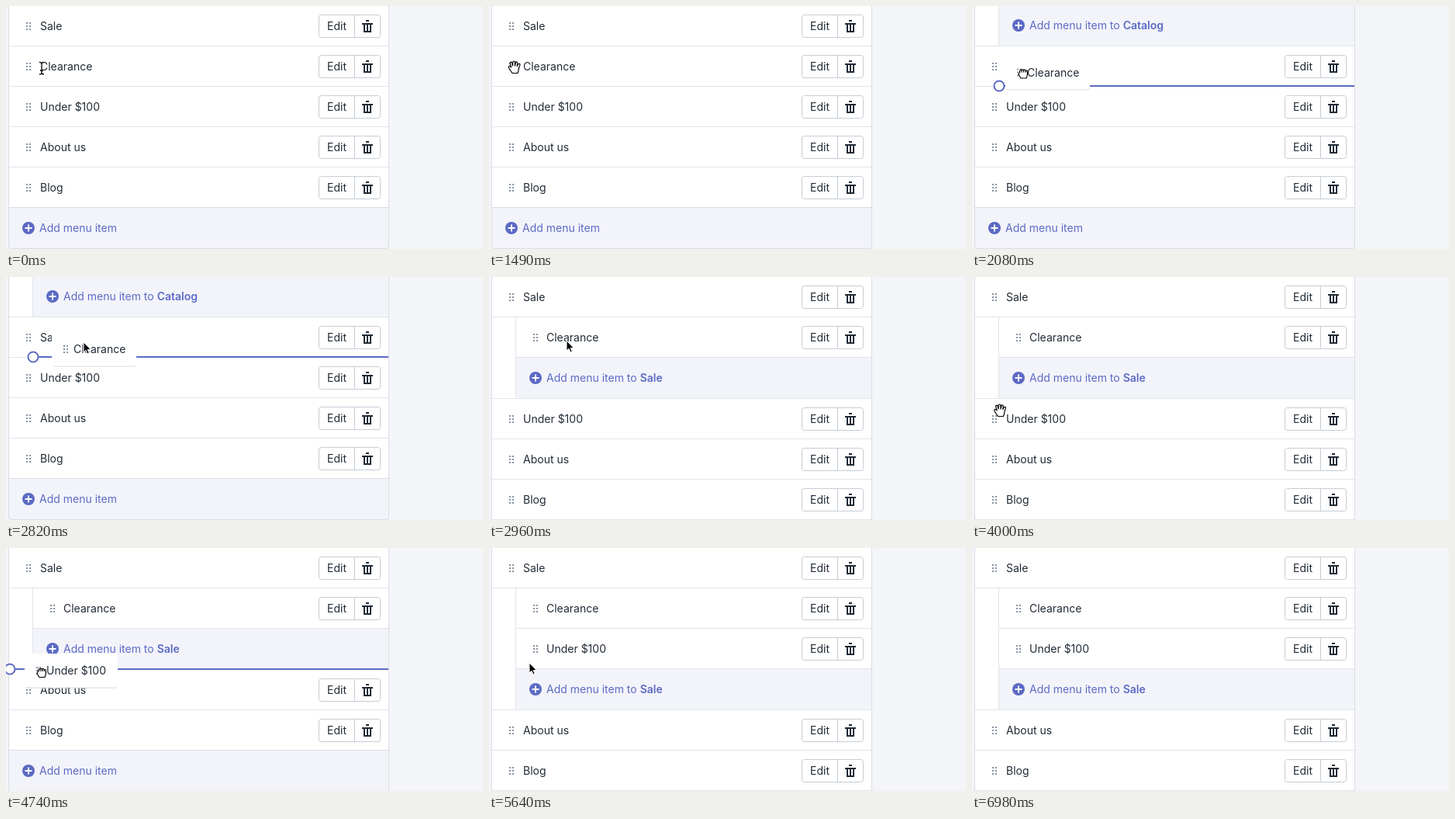
Animation of 615x313 px, one loop 7650 ms. Source, as an HTML page:

```html
<!DOCTYPE html>
<html lang="en">
<head>
<meta charset="utf-8">
<title>Nested menu editor</title>
<style>
html, body { margin: 0; width: 100%; height: 100%; overflow: hidden; background: #f4f5f9; }
svg { display: block; font: 14px Inter, "Open Sans", sans-serif; }
text { fill: #212b36; white-space: pre; }
.strong { font-weight: 600; }
</style>
</head>
<body>
<svg id="stage" width="615" height="313" viewBox="0 0 615 313"></svg>
<script>
const LOOP = 7650, TICK = 148.3;
const INDIGO = '#5c6ac4', TINT = '#f3f4fa', LINE = '#e1e4ea', EDGE = '#d9dde4';
const stage = document.getElementById('stage');

// [first tick, entries]: '>' is a nested item, '+' an add button
const scenes = [
  [0, ['Sale', 'Clearance', 'Under $100', 'About us', 'Blog', '+']],
  [11, ['+Catalog', 'Sale', 'Under $100', 'About us', 'Blog', '+']],
  [20, ['Sale', '>Clearance', '+Sale', 'Under $100', 'About us', 'Blog']],
  [31, ['Sale', '>Clearance', '+Sale', 'About us', 'Blog', '+']],
  [37, ['Sale', '>Clearance', '>Under $100', '+Sale', 'About us', 'Blog']]
];

// [tick, x, y, shape]
const pointer = [
  [0, 46, 80, 'beam'], [2, 36, 80, 'open'], [3, 31, 80, 'open'], [9, 31, 80, 'open'],
  [10, 33, 79, 'open'], [11, 35, 80, 'fist'], [17, 97, 93, 'fist'], [18, 99, 93, 'fist'],
  [19, 100, 84, 'arrow'], [20, 100, 82, 'arrow'], [23, 100, 82, 'arrow'],
  [24, 72, 131, 'point'], [25, 66, 139, 'point'], [26, 48, 162, 'open'], [28, 25, 182, 'open'],
  [29, 29, 184, 'open'], [30, 29, 184, 'open'], [31, 33, 180, 'fist'], [32, 46, 160, 'fist'],
  [33, 60, 145, 'fist'], [35, 60, 145, 'fist'], [36, 54, 148, 'arrow'], [38, 52, 148, 'arrow'],
  [40, 52, 148, 'arrow'], [41, 60, 152, 'arrow'], [42, 140, 215, 'arrow'], [44, 372, 250, 'arrow'],
  [45, 531, 258, 'arrow'], [46, 374, 298, 'arrow'], [47, 374, 330, 'arrow']
];

// dragged label, its width, line height of the drop marker, and text positions
const drags = [
  { name: 'Clearance', width: 66, mark: 103, path: [[11, 41, 78], [17, 101, 93], [18, 101, 93], [19, 87, 93]] },
  { name: 'Under $100', width: 77, mark: 156, path: [[31, 39, 178], [32, 52, 158], [33, 66, 142], [35, 66, 142], [36, 69, 136]] }
];

const shapes = {
  arrow: 'M0 0V13L3 10.2 5.1 15 7.2 14.1 5.2 9.5H9.3Z',
  open: 'M-3 7.5L-7 1.5Q-8.5-.8-7-1.5-5.8-1.9-4.4 0L-5.8-5Q-6-6.7-4.8-6.8-3.6-6.8-3.2-5.2L-2.4-2-2.3-6.5Q-2.2-8-1-8 .3-8 .4-6.5L.5-2 1.4-6Q1.8-7.3 3-7 4-6.7 3.7-5L3.2-1.5 4.8-4Q5.7-5.2 6.6-4.5 7.3-3.9 6.8-2.6 5.5 0 5.3 2.5 5 5 4 7.5Z',
  point: 'M-2 8L-6.5 1.8Q-7 0-5.5 0L-3.5 1.8V-6.2Q-3.3-7.8-2-7.8T-.7-6.2V-1.5Q1-2.6 2-1 3.6-1.9 4.4-.4 6.4-1 6.5 1V4Q6.3 6 5 8ZM-.7-1.5V2M2-1V2M4.4-.4V2',
  fist: 'M-3 6.5L-5.5 2.5Q-6.5 0-4.5-.8L-4.3-3Q-3.5-5-2-3.8-.8-5.5 .6-4 2-5 3.2-3.4 5.2-4 5.4-1.5V2Q5 4 4 6.5ZM-2-3.8V-1M.6-4V-1M3.2-3.4V-1'
};

const rect = (x, y, w, h, fill, more = '') =>
  `<rect x="${x}" y="${y}" width="${w}" height="${h}" fill="${fill}" ${more}/>`;
const path = (d, more) => `<path d="${d}" ${more}/>`;
const label = (x, y, s, more = '') => `<text x="${x}" y="${y + 5}" ${more}>${s}</text>`;

function handle(x, y) {
  let d = '';
  for (let i = 0; i < 6; i++) d += `M${x - 3 + i % 2 * 4} ${y - 5 + (i >> 1) * 4}h2v2h-2z`;
  return path(d, 'fill="#8794a3"');
}

function row(name, y, nested) {
  return handle(nested ? 60 : 29, y) + label(nested ? 74 : 44, y, name) +
    rect(403.5, y - 14.5, 79, 29, '#fff', 'rx="3" stroke="#c4cdd5"') +
    path(`M449.5 ${y - 14}v28`, 'stroke="#c4cdd5"') + label(414, y, 'Edit') +
    path('M3 6h14v2h-2v10H5V8H3zM8 2h4v2H8zM7 8v8h2V8zM11 8v8h2V8z',
      `transform="translate(456 ${y - 10})" fill="#212b36" fill-rule="evenodd"`);
}

function addButton(parent, y, hot) {
  const x = parent ? 60 : 29, left = parent ? 34 : 4;
  const fore = hot ? '#fff' : INDIGO, back = hot ? INDIGO : '#fff';
  const words = parent ? `Add menu item to <tspan class="strong">${parent}</tspan>` : 'Add menu item';
  return rect(left, y - 26, 493 - left, 52, hot ? INDIGO : TINT) +
    `<circle cx="${x}" cy="${y}" r="8" fill="${fore}"/>` +
    path(`M${x - 4.5} ${y}h9M${x} ${y - 4.5}v9`, `stroke="${back}" stroke-width="2"`) +
    label(x + 14, y, words, `style="fill:${fore}"`);
}

function menu(entries, hot) {
  let y = entries[0][0] === '+' ? 25 : 26, out = '';
  for (const entry of entries) {
    const add = entry[0] === '+', nested = entry[0] === '>';
    const name = add || nested ? entry.slice(1) : entry;
    const subAdd = add && name;
    const bottom = y + (add ? 26.5 : 25.5);
    out += add ? addButton(name, y, hot && subAdd) : row(name, y, nested);
    if (nested || subAdd) out += path(`M34.5 ${y - 26}v52`, `stroke="${hot && subAdd ? INDIGO : LINE}"`);
    if (add && !name) out += path(`M4 ${y - 26.5}H493`, `stroke="${EDGE}"`);
    else out += path(`M${nested ? 34 : 4} ${bottom}H493`, `stroke="${LINE}"`);
    y += subAdd ? 53 : 52;
  }
  const frame = fill => rect(3.5, -9.5, 490, y - 16, fill, `rx="3" stroke="${EDGE}"`);
  return frame('#fff') + out + frame('none');
}

function at(keys, tick) {
  let i = 0;
  while (i < keys.length - 1 && keys[i + 1][0] <= tick) i++;
  const a = keys[i], b = keys[i + 1] || a;
  const p = a === b ? 0 : (tick - a[0]) / (b[0] - a[0]);
  return { x: a[1] + (b[1] - a[1]) * p, y: a[2] + (b[2] - a[2]) * p, shape: a[3] };
}

function dragged({ name, width, mark, path: keys }, tick) {
  const { x, y } = at(keys, tick);
  const dot = x > 60 ? 35 : 5;
  return path(`M${dot + 6} ${mark}H493`, `stroke="${INDIGO}" stroke-width="2"`) +
    `<circle cx="${dot}" cy="${mark}" r="6.5" fill="#fff" stroke="${INDIGO}" stroke-width="2"/>` +
    rect(x - 27, y - 20, width + 42, 43, '#d9dce3', 'rx="3" opacity=".7"') +
    rect(x - 28, y - 22, width + 43, 43.5, '#fff', 'rx="3"') +
    handle(x - 10, y) + label(x, y, name);
}

function cursor({ x, y, shape }) {
  const place = `transform="translate(${x} ${y})"`;
  if (shape === 'beam') {
    const d = 'M-3-7.5Q0-7.5 0-5.5 0-7.5 3-7.5M0-5.5V6M-3 8Q0 8 0 6 0 8 3 8M-2 3H2';
    return path(d, `${place} fill="none" stroke="#fff" stroke-width="3"`) +
      path(d, `${place} fill="none" stroke="#000" stroke-width="1.3"`);
  }
  const paint = shape === 'arrow' ? 'fill="#000" stroke="#fff"' : 'fill="#fff" stroke="#000" stroke-width="1.2"';
  return path(shapes[shape], `${place} ${paint} stroke-linejoin="round"`);
}

let last = -1;
function draw(now) {
  const tick = Math.floor(now % LOOP / TICK + 0.08);
  if (tick !== last) {
    last = tick;
    const hand = at(pointer, tick);
    const entries = scenes.filter(s => s[0] <= tick).pop()[1];
    const drag = drags.find(d => tick >= d.path[0][0] && tick <= d.path[d.path.length - 1][0]);
    stage.innerHTML = menu(entries, hand.shape === 'point') + (drag ? dragged(drag, tick) : '') + cursor(hand);
  }
  requestAnimationFrame(draw);
}
draw(performance.now());
</script>
</body>
</html>
```
